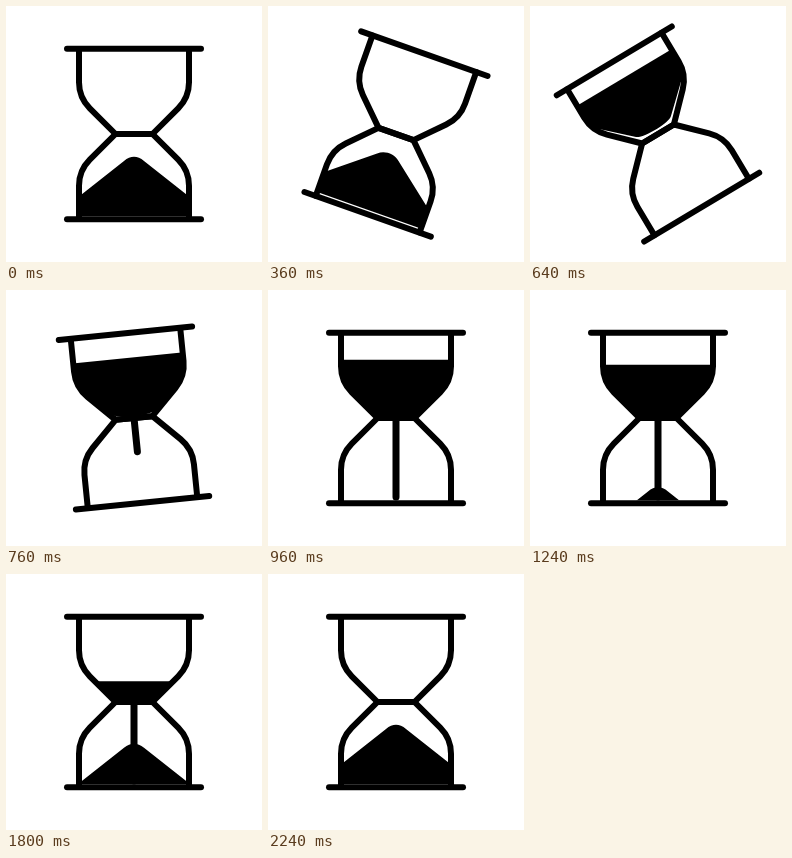
An HTML page with a canvas for the animation above (3.6 s loop, 256 px wide and 256 px high).

```html
<!DOCTYPE html>
<html lang="en">
<head>
<meta charset="utf-8">
<title>Hourglass</title>
<style>
  html, body { margin: 0; width: 100%; height: 100%; overflow: hidden; background: #fff; }
  canvas { display: block; width: 100vmin; height: 100vmin; }
</style>
</head>
<body>
<canvas id="stage" width="256" height="256"></canvas>
<script>
const ctx = document.getElementById('stage').getContext('2d');
const LOOP = 3600, STEP = 40;

// All shapes are drawn around the middle of the neck; the bulb lies below it.
const bulb = new Path2D('M-55 85V51.8A37 37 0 0 1 -44.2 25.7L-18.5 0H18.5L44.2 25.7A37 37 0 0 1 55 51.8V85');
const base = new Path2D('M-67 85.2H67');

const progress = (t, from, to) => Math.min(1, Math.max(0, (t - from) / (to - from)));
const mix = (a, b, k) => a + (b - a) * k;
const cubicInOut = k => k < .5 ? 4 * k ** 3 : 1 - 4 * (1 - k) ** 3;

// funnel: 0 is a rounded heap, 1 fills the bulb up to the neck
function drawSand(funnel, bottom, lift = 0) {
  if (bottom <= 0) return;
  const edge = mix(62.5, 36.5, funnel);
  const shoulderX = mix(10, 22.5, funnel), shoulderY = mix(27, 5, funnel);
  const crownX = mix(3.3, 18.5, funnel), crownY = mix(21.4, 0, funnel);
  ctx.save();
  ctx.clip(bulb);
  ctx.beginPath();
  ctx.rect(-60, 0, 120, bottom);
  ctx.clip();
  ctx.translate(0, lift);
  ctx.beginPath();
  ctx.moveTo(-55, 100);
  ctx.lineTo(-55, edge);
  ctx.lineTo(-shoulderX, shoulderY);
  ctx.bezierCurveTo(-crownX, crownY, crownX, crownY, shoulderX, shoulderY);
  ctx.lineTo(55, edge);
  ctx.lineTo(55, 100);
  ctx.fill();
  ctx.restore();
}

function drawStream(t) {
  const head = mix(0, 79, progress(t, 640, 920));
  const tail = mix(0, 32, progress(t, 2120, 2240));
  if (head <= 0 || t >= 2240) return;
  ctx.lineWidth = 7;
  ctx.beginPath();
  ctx.moveTo(0, tail);
  ctx.lineTo(0, head);
  ctx.stroke();
}

function drawGlassHalf() {
  ctx.lineWidth = 6;
  ctx.stroke(bulb);
  ctx.stroke(base);
}

function draw(t) {
  const turn = cubicInOut(progress(t, 120, 920));
  const slide = 24 * cubicInOut(progress(t, 160, 1000));
  const drained = Math.max(0, t - 1153) * .0577;
  const heapLeft = (1 - progress(t, 960, 2240)) ** 1.1;

  ctx.setTransform(1, 0, 0, 1, 0, 0);
  ctx.fillStyle = '#fff';
  ctx.fillRect(0, 0, 256, 256);
  ctx.fillStyle = ctx.strokeStyle = '#000';
  ctx.lineCap = ctx.lineJoin = 'round';
  ctx.translate(128, 128);
  ctx.rotate(Math.PI * turn);

  drawSand(turn, 82.2 - slide - drained);
  drawGlassHalf();

  ctx.rotate(Math.PI);
  if (t > 960) drawSand(0, 82.2, 61 * heapLeft);
  drawStream(t);
  drawGlassHalf();
}

function tick() {
  const t = performance.now() % LOOP;
  draw(Math.floor(t / STEP) * STEP);
  requestAnimationFrame(tick);
}
tick();
</script>
</body>
</html>
```
